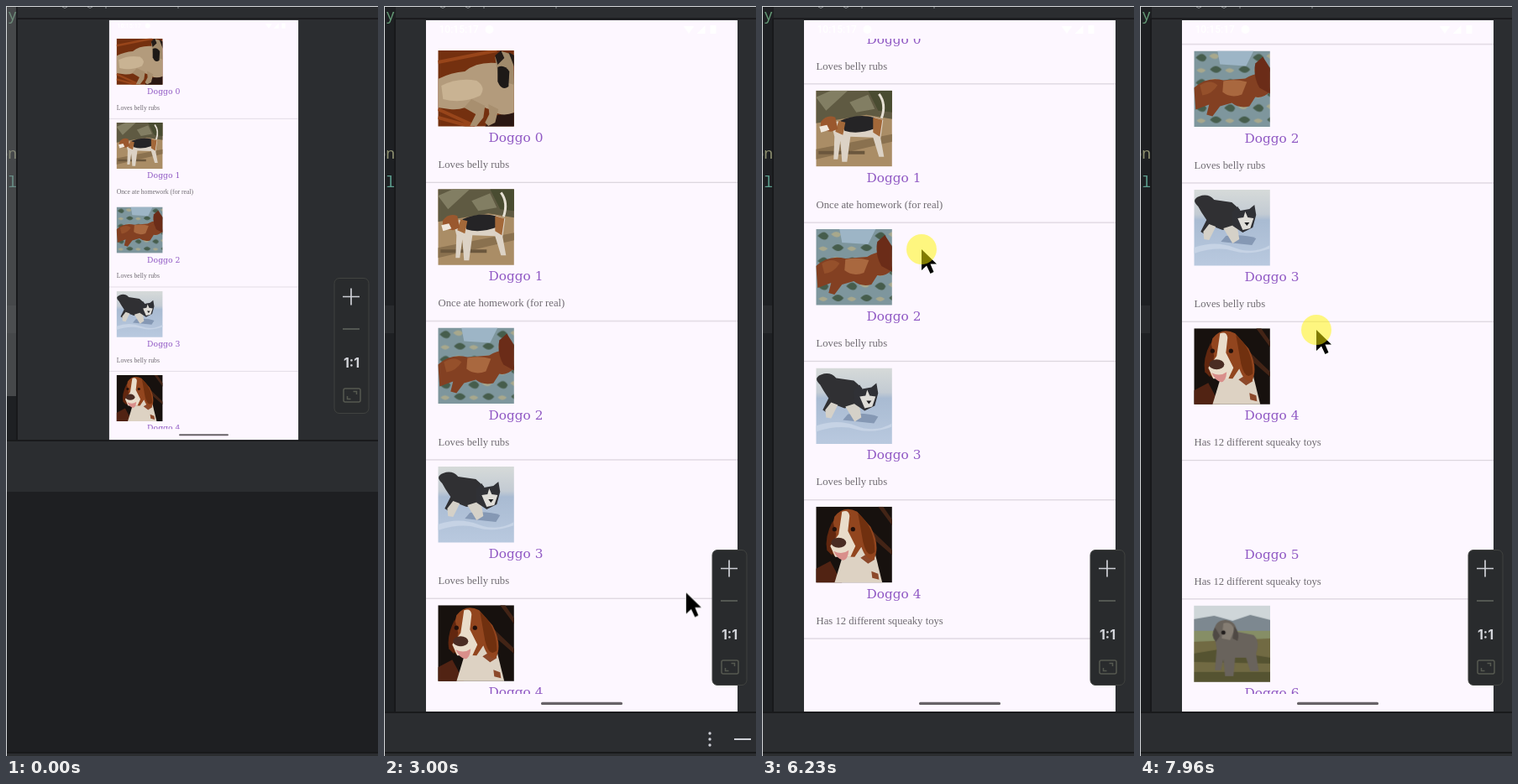
Write an HTML page that moves like this. It is 443 px wide and 894 px high and loops after 8000 ms.

```html
<!DOCTYPE html>
<html lang="en">
<head>
<meta charset="utf-8">
<title>Resizing a list preview</title>
<style>
@property --d { syntax: "<length>"; inherits: true; initial-value: 518px; }
@property --s { syntax: "<length>"; inherits: true; initial-value: 0px; }
@property --z { syntax: "<number>"; inherits: true; initial-value: 1; }

html, body { margin: 0; width: 100%; height: 100%; overflow: hidden; background: #1e1f22; }
svg { display: block; }
#stage { animation: drag 8s -10ms infinite, zoom 8s -10ms step-end infinite, scroll 8s -10ms infinite; }

/* --d: split line, --z: preview scale, --s: list scroll */
#preview { height: calc(var(--d) - 16px); }
#strip { height: var(--d); }
#split { transform: translateY(var(--d)); }
#phone { transform: translate(235.5px, calc((16px + var(--d)) / 2 - 412px * var(--z))) scale(var(--z)); }
#list { transform: translateY(calc(28px - var(--s))); }
#tools { transform: translateY(calc(var(--d) - 194px)); }
#cursor { animation: move 8s -10ms infinite; }
.blink { animation: 8s -10ms step-end infinite; }
#dim { animation-name: dim; }
#icons { animation-name: icons; }
#arrow { animation-name: arrow; }
#resize { animation-name: resize; }
#press { animation-name: press; }
#i6 { animation-name: late; }
#rule1 { animation-name: rule; }

.name { font: 15.3px "DejaVu Serif", serif; fill: #9059c4; }
.note { font: 12.7px "Liberation Serif", serif; fill: #706c72; }
.code { font: 18px "Noto Sans Mono", monospace; text-anchor: end; }
.ratio { font: bold 16px Inter, sans-serif; text-anchor: middle; fill: #d3d5da; }
.status { font: 500 12px Roboto, sans-serif; fill: #fff; }

@keyframes drag {
  0%, 15.125% { --d: 518px; animation-timing-function: steps(3); }
  17.625% { --d: 705px; animation-timing-function: steps(1); }
  18.5% { --d: 744px; animation-timing-function: steps(7); }
  24.625% { --d: 811px; animation-timing-function: steps(1); }
  25.5%, 100% { --d: 842px; }
}
@keyframes zoom { 0% { --z: .607; } 32.5%, 100% { --z: 1; } }
@keyframes scroll {
  0%, 73.625% { --s: 0px; animation-timing-function: steps(3); }
  76.25% { --s: 38px; animation-timing-function: steps(4); }
  79.6875% { --s: 197px; animation-timing-function: steps(3); }
  82.25%, 94.25% { --s: 265px; animation-timing-function: steps(6); }
  99.5%, 100% { --s: 330px; }
}
@keyframes move {
  0%, 2.125% { transform: translate(252px, 880px); animation-timing-function: steps(8); }
  9.25%, 15.125% { transform: translate(234px, 521px); animation-timing-function: steps(3); }
  17.625% { transform: translate(253px, 709px); animation-timing-function: steps(1); }
  18.5% { transform: translate(258px, 747px); animation-timing-function: steps(7); }
  24.625% { transform: translate(271px, 812px); animation-timing-function: steps(1); }
  25.5%, 27.25% { transform: translate(273px, 842px); animation-timing-function: steps(4); }
  30.75%, 36.625% { transform: translate(412px, 788px); animation-timing-function: steps(5); }
  41.25% { transform: translate(151px, 345px); animation-timing-function: steps(2); }
  43.125%, 47.25% { transform: translate(160px, 334px); animation-timing-function: steps(3); }
  49.75%, 73.625% { transform: translate(203px, 426px); animation-timing-function: steps(3); }
  76.25% { transform: translate(199px, 370px); animation-timing-function: steps(4); }
  79.6875% { transform: translate(181px, 210px); animation-timing-function: steps(3); }
  82.25%, 84.75% { transform: translate(174px, 142px); animation-timing-function: steps(5); }
  89.25%, 94.25% { transform: translate(200px, 474px); animation-timing-function: steps(6); }
  99.5%, 100% { transform: translate(210px, 386px); }
}
@keyframes press {
  0%, 26.375%, 32.5%, 83.125% { opacity: 0; }
  15.125%, 31.625%, 72.875%, 91.75%, 100% { opacity: 1; }
}
@keyframes arrow { 0%, 9.25% { opacity: 0; } 2.125%, 28.125%, 100% { opacity: 1; } }
@keyframes resize { 0%, 28.125%, 100% { opacity: 0; } 9.25% { opacity: 1; } }
@keyframes icons { 0%, 39.375%, 100% { opacity: 0; } 3.875% { opacity: 1; } }
@keyframes dim { 0% { opacity: 1; } 15.125%, 100% { opacity: 0; } }
@keyframes late { 0% { opacity: 0; } 92.625%, 100% { opacity: 1; } }
@keyframes rule { 0% { opacity: 0; } 32.5%, 100% { opacity: 1; } }
</style>
</head>
<body>
<svg id="stage" width="443" height="894" viewBox="0 0 443 894">
  <defs>
    <clipPath id="screen"><rect x="-185.5" y="22" width="371" height="781"/></clipPath>
    <clipPath id="square"><rect width="90.5" height="90.5"/></clipPath>
    <linearGradient id="snow" x2="0" y2="1">
      <stop stop-color="#d6dad9"/><stop offset=".32" stop-color="#c3cbd3"/>
      <stop offset=".4" stop-color="#a9bbd2"/><stop offset="1" stop-color="#b9c9df"/>
    </linearGradient>
    <pattern id="floral" width="34" height="30" patternUnits="userSpaceOnUse">
      <rect width="34" height="30" fill="#7e969d"/>
      <path d="M2 8q8-9 13 0q-3 9-13 0M19 22q7-8 14 0q-6 8-14 0" fill="#465d4c"/>
      <path d="M18 6q6-6 12 0q-4 7-12 0M3 23q5-5 11 0q-5 6-11 0" fill="#a8a88c"/>
    </pattern>

    <g id="p0">
      <path d="M0 0h91v91H0z" fill="#74300f"/>
      <path d="M0 14L70 0M0 80l40 11M0 70l44 20" stroke="#98451a" stroke-width="4"/>
      <path d="M56 91l8-13 27-4v17z" fill="#2a1712"/>
      <path d="M0 34Q16 26 32 25 46 13 70 15L91 40V74Q76 80 66 72 54 68 44 62 30 72 14 70L0 68z" fill="#b39b7c"/>
      <path d="M4 42Q24 32 46 36 58 44 50 54 28 64 6 58z" fill="#c9b393"/>
      <path d="M40 58l16 8-2 14-8 10h-8l7-14-14-8zM60 64l12 6-4 16-8 4-4-4 5-10z" fill="#a88f6f"/>
      <path d="M68 8l8-7 13 4 2 36q-14-3-20-14z" fill="#a08a6b"/>
      <path d="M71 20q8-4 14 5l-1 18q-8 6-13-6z" fill="#1d1917"/>
      <path d="M68 6l7-6 4 9-8 8zM84 2l7 4v14z" fill="#241c18"/>
    </g>
    <g id="p1">
      <path d="M0 0h91v91H0z" fill="#aa8d66"/>
      <path d="M0 0h91v34L60 29 0 39z" fill="#5f5a42"/>
      <path d="M0 8l18-8h20L12 24zM40 14l22-9 8 17-22 4z" fill="#827e63"/>
      <path d="M62 0h29v26L74 24z" fill="#494c31"/>
      <path d="M0 70l91-18v9L0 82z" fill="#8a714f"/>
      <path d="M3 72h55v4H3z" fill="#6b573d"/>
      <path d="M78 33Q84 16 75 4" stroke="#e5dfd3" stroke-width="3" fill="none"/>
      <path d="M18 38L67 31 80 35 77 57 81 79H75L68 56 41 55 37 85H31L29 60 26 82H21L22 55z" fill="#dcd2c5"/>
      <path d="M29 36Q49 27 69 32L71 45Q50 53 34 48z" fill="#252426"/>
      <path d="M68 32l11 3-3 20-8-5zM27 36l8 2-3 15-9-4z" fill="#a36839"/>
      <path d="M6 37Q13 28 23 32L26 46 18 49 5 47z" fill="#9a582e"/>
      <path d="M4 43l9-2 3 6-10 3z" fill="#efe7dd"/>
    </g>
    <g id="p2">
      <path d="M0 0h91v91H0z" fill="url(#floral)"/>
      <path d="M28 0h43l-9 18-31-2z" fill="#9db5c6"/>
      <path d="M0 44Q15 30 35 35L61 33Q73 25 86 28L91 48Q82 57 73 55L66 66Q54 69 45 62L31 66 22 78 15 76 18 64 2 70z" fill="#834022"/>
      <path d="M35 36Q49 33 63 37L57 52Q44 57 34 49z" fill="#a9683f"/>
      <path d="M73 15l9-8 9 14v30l-13-7q-8-14-5-29z" fill="#6b2c18"/>
      <path d="M7 41q13-8 21 0-7 11-18 12z" fill="#95502b"/>
    </g>
    <g id="p3">
      <path d="M0 0h91v91H0z" fill="url(#snow)"/>
      <path d="M0 69q25-9 48 0t43-3v4q-25 9-44 3T0 76z" fill="#c6d3e5"/>
      <path d="M38 55q23-2 36 3l-5 8-37-4z" fill="#8598b4"/>
      <path d="M5 20Q-4 12 6 8 17 4 24 12L45 15 55 24 51 44 34 48 21 43 14 54 8 50 15 36 9 27z" fill="#303033"/>
      <path d="M11 50l7-9 8 3-8 16-6-1zM35 46l16-5 3 18-8 5z" fill="#d5d1c8"/>
      <path d="M45 27l7-7 3 5 11-2 6-5 2 12-4 15-12 6-12-8z" fill="#303136"/>
      <path d="M52 34l7-1 2-7 3 7 7 1-4 12-9 2z" fill="#dfddd8"/>
      <path d="M60 39h6l-3 4z" fill="#1b1b1e"/>
    </g>
    <g id="p4">
      <path d="M0 0h91v91H0z" fill="#17110e"/>
      <path d="M64 26l27 26v6L61 32zM80 0l11 16v7L74 0z" fill="#432416"/>
      <path d="M0 74l17-9 14 26H0z" fill="#512313"/>
      <path d="M32 58l35-16 12 49H22z" fill="#ddd2c3"/>
      <path d="M53 61l13-8 4 10-8 5zM66 77l8 3 1 7-8-2z" fill="#8c492b"/>
      <path d="M22 12Q33-2 49 6L65 24Q77 47 69 63 60 65 54 48L46 60 22 59 14 47z" fill="#92451e"/>
      <path d="M20 17Q10 36 13 52L19 58 24 33z" fill="#62270f"/>
      <path d="M50 8q20 16 20 46-9 9-14-12z" fill="#70300f"/>
      <path d="M31 6q8-3 9 5l-2 18 9 18-6 13H23l-6-13 10-14z" fill="#e9dcca"/>
      <ellipse cx="27" cy="43" rx="9" ry="6" fill="#4a2c23"/>
      <path d="M21 53q10 5 18-1-1 12-7 12-7-2-11-11" fill="#d98f8b"/>
      <circle cx="22" cy="27" r="2.6" fill="#22100b"/><circle cx="44" cy="27" r="2.6" fill="#22100b"/>
    </g>
    <g id="p6">
      <path d="M0 0h91v91H0z" fill="#716a43"/>
      <path d="M0 0h91v25H0z" fill="#cfd6d9"/>
      <path d="M0 16l24-4 22 6 21-7 24 6v13H0z" fill="#7d8890"/>
      <path d="M0 30h91v9L0 43z" fill="#868e66"/>
      <path d="M0 57l30-5 61 10v7L0 67zM0 79h91v12H0z" fill="#555331"/>
      <path d="M24 32Q24 18 37 17 50 18 51 31L71 35Q79 42 74 57L77 78H67L62 62 49 62 47 84H37L35 64 32 77H25L27 52z" fill="#69635c"/>
      <path d="M35 21q10-3 13 8l-5 12-10-2z" fill="#857d73"/>
      <path d="M25 26q-6 9 1 17l5-7zM48 25q7 7 4 17l-6-3z" fill="#4f4944"/>
      <circle cx="35" cy="32" r="2.5" fill="#211d1c"/>
    </g>
  </defs>

  <rect width="443" height="894" fill="#1e1f22"/>
  <rect x="14" width="429" height="15" fill="#2b2d30"/>
  <path d="M67 1q3 3 6 0M97 1q3 3 6 0M119 1v2M205 1v2" stroke="#85888c" fill="none"/>
  <rect id="preview" x="14" y="16" width="429" fill="#2b2d30"/>
  <rect id="strip" width="12" fill="#1e2023"/>
  <rect y="357" width="12" height="33" fill="#292b2e"/>
  <path d="M13 15V894" stroke="#18191b" stroke-width="2"/>
  <path d="M12 15H443" stroke="#18191b" stroke-width="1.5"/>
  <g class="code">
    <text x="13" y="17" fill="#659b77">y</text>
    <text x="13" y="182" fill="#8e9070">on</text>
    <text x="13" y="216" fill="#5d9d8e">al</text>
  </g>
  <rect id="dim" class="blink" x="1" y="1" width="11" height="464" fill="#77797b" fill-opacity=".45"/>

  <g id="split">
    <rect width="443" height="61" fill="#2b2d30"/>
    <rect y="61" width="443" height="400" fill="#1e1f22"/>
    <path d="M0 0H443" stroke="#191a1c" stroke-width="2"/>
    <g id="icons" class="blink" fill="#ced0d6">
      <circle cx="388" cy="25" r="1.7"/><circle cx="388" cy="32" r="1.7"/><circle cx="388" cy="39" r="1.7"/>
      <rect x="417" y="31" width="20" height="2"/>
    </g>
  </g>
  <rect y="889" width="443" height="2" fill="#18191b"/>
  <rect y="891" width="443" height="3" fill="#2b2d30"/>

  <g id="phone">
    <rect x="-185.5" width="371" height="824" fill="#fdf7ff"/>
    <text class="status" x="-170" y="15">10:15:17</text>
    <g fill="#fff">
      <circle cx="-110" cy="11" r="5"/>
      <path d="M121 7h13l-6.500 9zM147 6v10h-10zM153 6h7v10h-7z"/>
    </g>
    <g clip-path="url(#screen)"><g id="list"></g></g>
    <rect x="-48.500" y="812.700" width="97" height="3.300" rx="1.500" fill="#676267"/>
  </g>

  <g id="tools">
    <rect x="391" y=".5" width="41" height="161" rx="6" fill="#292b2d" stroke="#414340"/>
    <path d="M401 22.500h20M411 12.500v20" stroke="#ced0d6" stroke-width="1.700"/>
    <path d="M401 61h20" stroke="#5c5f59" stroke-width="1.700"/>
    <text class="ratio" x="411.500" y="106.500">1:1</text>
    <g fill="none" stroke="#565950" stroke-width="1.500">
      <rect x="402" y="132" width="20" height="16" rx="2"/>
      <path d="M406.500 141v3.500h4M413.500 135.500h4v3.500"/>
    </g>
  </g>

  <path d="M0 .5H443M.5 0V894" stroke="#d5d8da"/>

  <g id="cursor">
    <path id="arrow" class="blink" d="M0 0V25L6 19.500 10.500 29 14.500 27 10.500 17.500H18z"
      stroke="#fff" stroke-width="1.500" paint-order="stroke" stroke-linejoin="round"/>
    <path id="resize" class="blink" d="M0-11.500L4.500-6H1V6H4.500L0 11.500-4.500 6H-1V-6H-4.500z"
      fill="#111" stroke="#fff" stroke-width="1.200"/>
    <circle id="press" class="blink" r="18" fill="#fff500" fill-opacity=".5"/>
  </g>
</svg>
<script>
const RUBS = "Loves belly rubs";
const TOYS = "Has 12 different squeaky toys";
const notes = [RUBS, "Once ate homework (for real)", RUBS, RUBS, TOYS, TOYS, RUBS];
const pitch = 165.3;
const unloaded = 5;

const photo = i => `
  <g id="i${i}" class="blink">
    <use href="#p${i}" transform="translate(14.3 8)" clip-path="url(#square)"/>
  </g>`;

const row = (note, i) => `
  <g transform="translate(-185.5 ${i * pitch})">
    ${i === unloaded ? "" : photo(i)}
    <text class="name" x="74.5" y="117">Doggo ${i}</text>
    <text class="note" x="14.5" y="148">${note}</text>
    <rect id="rule${i}" class="blink" y="164.7" width="371" height="1.3" fill="#ddd6df"/>
  </g>`;

document.getElementById("list").innerHTML = notes.map(row).join("");
</script>
</body>
</html>
```
